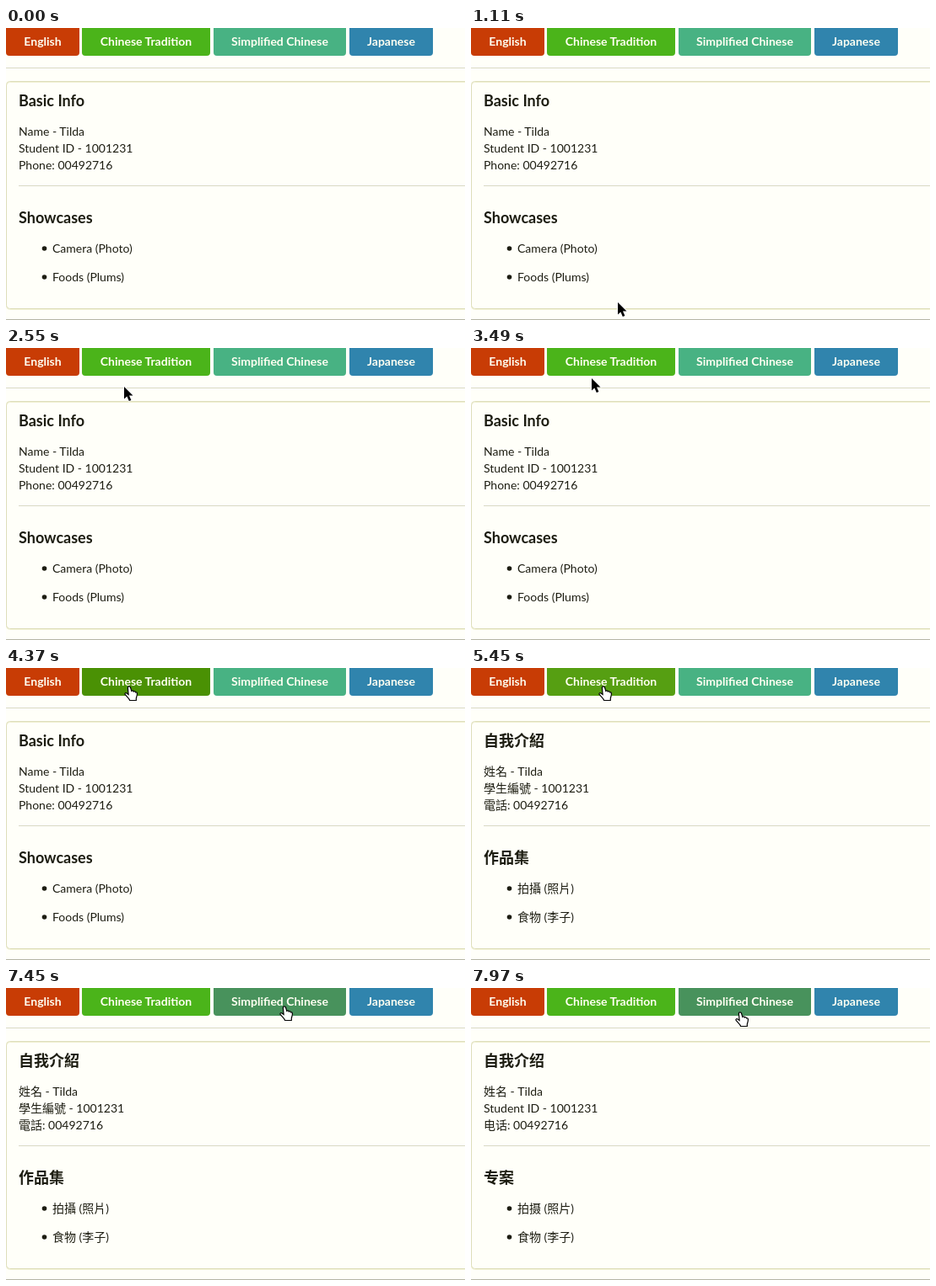
Write an HTML page that moves like this. It is 544 by 347 pixels and loops after 8 s.

```html
<!DOCTYPE html>
<html lang="en">
<head>
<meta charset="utf-8">
<title>Language switcher</title>
<style>
  html, body { margin: 0; width: 100%; height: 100%; overflow: hidden; background: #fffff9; }
  svg { display: block; }
  text { font: 14px Lato, "Noto Sans CJK TC", "Noto Sans CJK SC", "Noto Sans CJK", sans-serif; fill: #1d1d12; white-space: pre; }
  .title { font-size: 18px; font-weight: 700; }
  .button text { font-weight: 700; fill: #fffff2; text-anchor: middle; }
</style>
</head>
<body>
<svg width="544" height="347" viewBox="0 0 544 347">
  <g id="buttons"></g>
  <path d="M0 47.5H544M15 187.5H544" stroke="#d9d9c5"/>
  <rect x=".5" y="64.5" width="560" height="270" rx="4" fill="none" stroke="#f0f0d2"/>
  <rect x=".5" y="63.5" width="560" height="270" rx="4" fill="none" stroke="#dedebb"/>
  <path d="M0 346.5H544" stroke="#b5b5a5"/>
  <g id="content"></g>
  <circle cx="45.5" cy="262" r="2.8" fill="#1d1d12"/>
  <circle cx="45.5" cy="296" r="2.8" fill="#1d1d12"/>
  <path id="arrow" d="M0 0V14.5L3.4 11.4L5.8 17L8.4 16L6 10.4H10.5Z" fill="#000" stroke="#fff" paint-order="stroke" stroke-width="1.6"/>
  <path id="hand" d="M-1.6 1.6C-1.9-.4 .9-.8 1.5 1L2.8 5.4C3.6 4.6 5 4.8 5.3 6C6.2 5.3 7.3 5.8 7.6 6.9C8.6 6.4 9.4 7.2 9.4 8.4C9.6 11 8.6 12 8.3 14.2V16.5H.6C.3 14.5-2.5 12.5-4.9 9.4C-5.6 8.2-4.2 7-2.9 8L-.9 9.4Z" fill="#fff" stroke="#000" stroke-width="1.2"/>
</svg>
<script>
const LOOP = 8000, TRADITIONAL_AT = 4600, SIMPLIFIED_AT = 7620;
const $ = id => document.getElementById(id);

const buttons = [
  { label: "English", x: 0, w: 87, color: "#c83c05", hover: "#b03400" },
  { label: "Chinese Tradition", x: 90, w: 152, color: "#4bb41a", hover: "#4a9104", focus: "#569f12" },
  { label: "Simplified Chinese", x: 246, w: 157, color: "#48b283", hover: "#48925c" },
  { label: "Japanese", x: 407, w: 99, color: "#3084ad", hover: "#287199" }
];

// Two headings, three profile lines and two list items per language.
const places = [[15, 93, 1], [15, 128], [15, 148], [15, 168], [15, 232, 1], [55, 267], [55, 301]];
const languages = [
  ["Basic Info", "Name - Tilda", "Student ID - 1001231", "Phone: 00492716", "Showcases", "Camera (Photo)", "Foods (Plums)"],
  ["自我介紹", "姓名 - Tilda", "學生編號 - 1001231", "電話: 00492716", "作品集", "拍攝 (照片)", "食物 (李子)"],
  ["自我介绍", "姓名 - Tilda", "Student ID - 1001231", "电话: 00492716", "专案", "拍摄 (照片)", "食物 (李子)"]
];

// Pointer path: time, x, y
const path = [
  [830, 180, 350], [1110, 174, 326], [1570, 168, 272], [2400, 140, 46], [3370, 140, 46],
  [3650, 146, 22], [4370, 146, 22], [4700, 157, 22], [5870, 157, 22], [6050, 220, 42],
  [6330, 305, 31], [6600, 320, 22], [7000, 340, 22], [7450, 330, 22], [7800, 319, 29], [LOOP, 319, 29]
];

$("buttons").innerHTML = buttons.map(b =>
  `<g class="button"><rect x="${b.x}" y="-3" width="${b.w}" height="36" rx="4"/>
   <text x="${b.x + b.w / 2}" y="21">${b.label}</text></g>`).join("");
$("content").innerHTML = places.map(([x, y, title]) =>
  `<text x="${x}" y="${y}" class="${title ? "title" : ""}"></text>`).join("");
const rects = document.querySelectorAll(".button rect");
const lines = document.querySelectorAll("#content text");
let shownLanguage = -1;

function pointerAt(t) {
  const next = path.findIndex(p => p[0] > t);
  if (next < 1) return [-50, 400];
  const [t0, x0, y0] = path[next - 1], [t1, x1, y1] = path[next];
  const k = (t - t0) / (t1 - t0);
  return [x0 + (x1 - x0) * k, y0 + (y1 - y0) * k];
}

function showLanguage(index) {
  if (index === shownLanguage) return;
  shownLanguage = index;
  $("content").setAttribute("lang", ["en", "zh-Hant", "zh-Hans"][index]);
  lines.forEach((line, i) => line.textContent = languages[index][i]);
}

function draw(now) {
  const t = now % LOOP;
  const [x, y] = pointerAt(t);
  const hovered = buttons.findIndex(b => y < 33 && x >= b.x && x < b.x + b.w);
  rects.forEach((rect, i) => {
    const b = buttons[i];
    const active = t >= TRADITIONAL_AT && b.focus || b.hover;
    rect.setAttribute("fill", i === hovered ? active : b.color);
  });
  showLanguage((t >= TRADITIONAL_AT) + (t >= SIMPLIFIED_AT));

  const place = `translate(${Math.round(x)} ${Math.round(y)})`;
  for (const id of ["arrow", "hand"]) {
    $(id).setAttribute("transform", place);
    $(id).setAttribute("visibility", (id === "hand") === (hovered >= 0) ? "visible" : "hidden");
  }
  requestAnimationFrame(draw);
}
requestAnimationFrame(draw);
</script>
</body>
</html>
```
